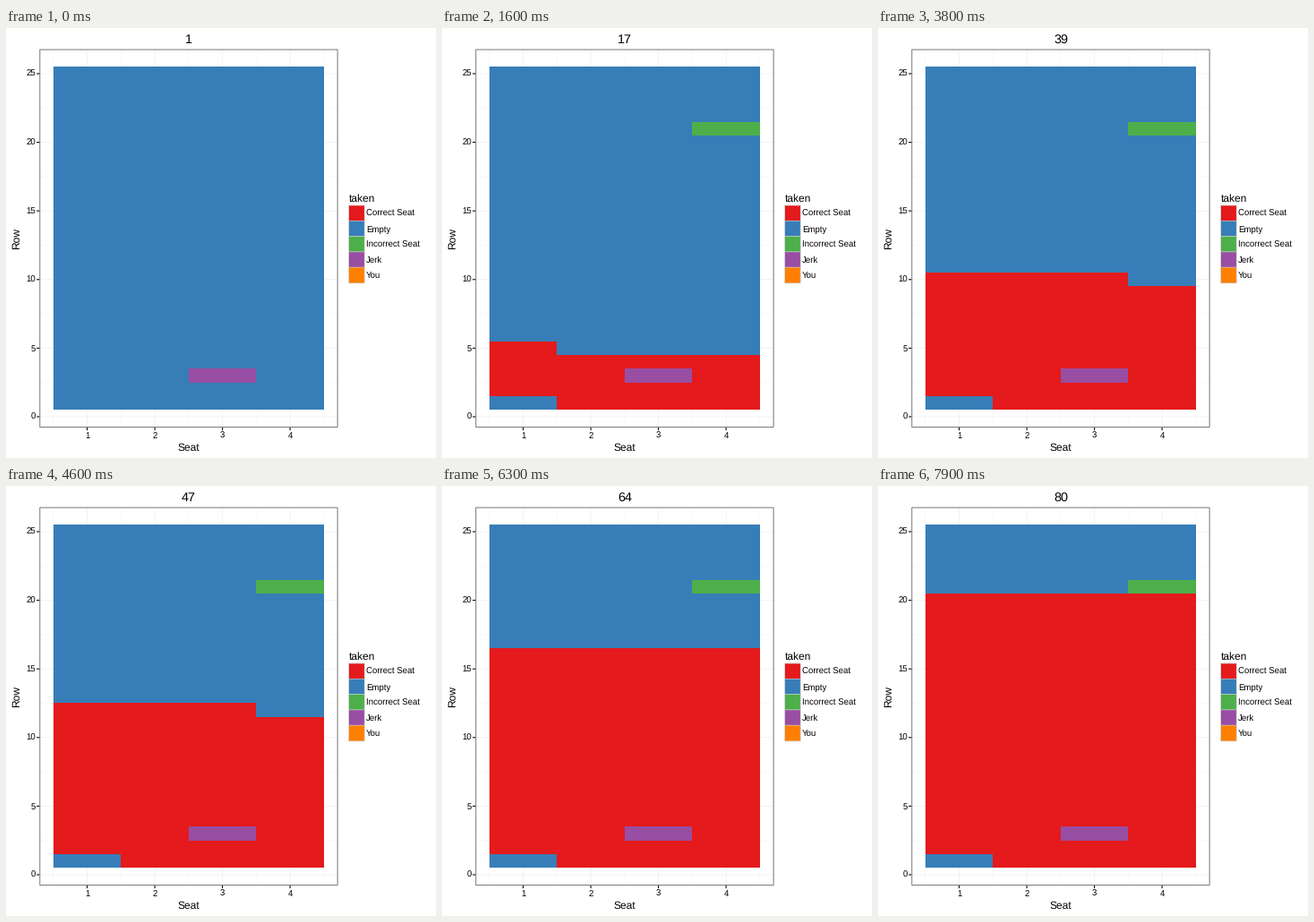
Write a matplotlib script that moves like this. It is 480 px wide and 480 px high and loops after 8 s.

```python
import matplotlib.pyplot as plt
from matplotlib.animation import FuncAnimation
from matplotlib.patches import Rectangle

plt.rcParams["font.family"] = "Liberation Sans"
plt.rcParams["text.hinting"] = "none"

SIZE, DPI = 480, 72
ROWS, SEATS, STEPS = 25, 4, 80
LEFT, RIGHT, TOP, BOTTOM = 37.8, 370.1, 24.1, 445.5
LINE = 1.07

RED, BLUE, GREEN = "#e41a1c", "#377eb8", "#4daf4a"
PURPLE, ORANGE = "#984ea3", "#ff7f00"
LEGEND = [("Correct Seat", RED), ("Empty", BLUE), ("Incorrect Seat", GREEN),
          ("Jerk", PURPLE), ("You", ORANGE)]

JERK = (3, 3)       # (row, seat) wrongly taken by the first passenger
MOVED = (21, 4)     # where the displaced passenger ends up

fig = plt.figure(figsize=(SIZE / DPI, SIZE / DPI), dpi=DPI, facecolor="white")
ax = fig.add_axes([0, 0, 1, 1])
ax.set(xlim=(0, SIZE), ylim=(SIZE, 0))
ax.axis("off")


def seat_x(s):
    return 15.1 + 75.5 * s


def row_y(r):
    return 433.97 - 15.32 * r


def line(x, y, color, width=LINE, z=1):
    ax.plot(x, y, color=color, lw=width, zorder=z, snap=False,
            solid_capstyle="butt")


def label(x, y, text, size=9.6, **kw):
    return ax.text(x, y, text, fontsize=size, color="black", zorder=6, **kw)


def box(x, y, w, h, z, **kw):
    return ax.add_patch(Rectangle((x, y), w, h, zorder=z, **kw))


def grid(xs, ys, color, width, z):
    for x in xs:
        line([x, x], [TOP, BOTTOM], color, width, z)
    for y in ys:
        line([LEFT, RIGHT], [y, y], color, width, z)


# Panel
grid([seat_x(k + 0.5) for k in range(5)],
     [row_y(r + 2.5) for r in range(0, 25, 5)], "#fafafa", LINE, 1)
grid([seat_x(k) for k in range(1, 5)],
     [row_y(r) for r in range(0, 26, 5)], "#e5e5e5", 0.43, 2)
box(LEFT, TOP, RIGHT - LEFT, BOTTOM - TOP, 5, fill=False, ec="#7f7f7f",
    lw=LINE, snap=False)

# Axes
for s in range(1, SEATS + 1):
    line([seat_x(s)] * 2, [BOTTOM, BOTTOM + 3.6], "black", z=4)
    label(seat_x(s), 458.3, str(s), ha="center")
for r in range(0, ROWS + 1, 5):
    line([LEFT - 3.6, LEFT], [row_y(r)] * 2, "black", z=4)
    label(33, row_y(r) + 3.1, str(r), ha="right")
label(204, 472, "Seat", 12, ha="center")
label(17, 234.7, "Row", 12, ha="right", va="center", rotation=90,
      rotation_mode="default")

# Legend
KEY = 17.28
label(382.6, 194, "taken", 12)
for k, (name, color) in enumerate(LEGEND):
    y = 198.2 + KEY * k
    box(382.8, y, KEY, KEY, 3 + k / 10, fc="white", ec="#cccccc", lw=LINE,
        snap=False)
    box(382.95, y + 0.15, KEY - 0.3, KEY - 0.3, 3.05 + k / 10, fc=color,
        lw=0, snap=False)
    label(402, y + KEY / 2 + 3.4, name)

# Seats, listed in boarding order
tiles = []
for r in range(1, ROWS + 1):
    for s in range(1, SEATS + 1):
        x0, x1 = round(seat_x(s - 0.5)), round(seat_x(s + 0.5))
        y0, y1 = round(row_y(r + 0.5)), round(row_y(r - 0.5))
        tile = box(x0, y0, x1 - x0, y1 - y0, 3, fc=BLUE, lw=0,
                   antialiased=False)
        tiles.append(((r, s), tile))
title = label(204, 17, "1", 14.4, ha="center")
displaced = 1 + [pos for pos, _ in tiles].index(JERK)


def seat_color(order, pos, boarded):
    if pos == JERK:
        return PURPLE
    if pos == MOVED and boarded >= displaced:
        return GREEN
    return RED if 2 <= order <= boarded else BLUE


def update(i):
    boarded = i + 1
    title.set_text(str(boarded))
    for order, (pos, tile) in enumerate(tiles, 1):
        tile.set_facecolor(seat_color(order, pos, boarded))
    return [title]


anim = FuncAnimation(fig, update, frames=STEPS, interval=100,
                     init_func=lambda: update(0), repeat=True, repeat_delay=0)
plt.show()
```
